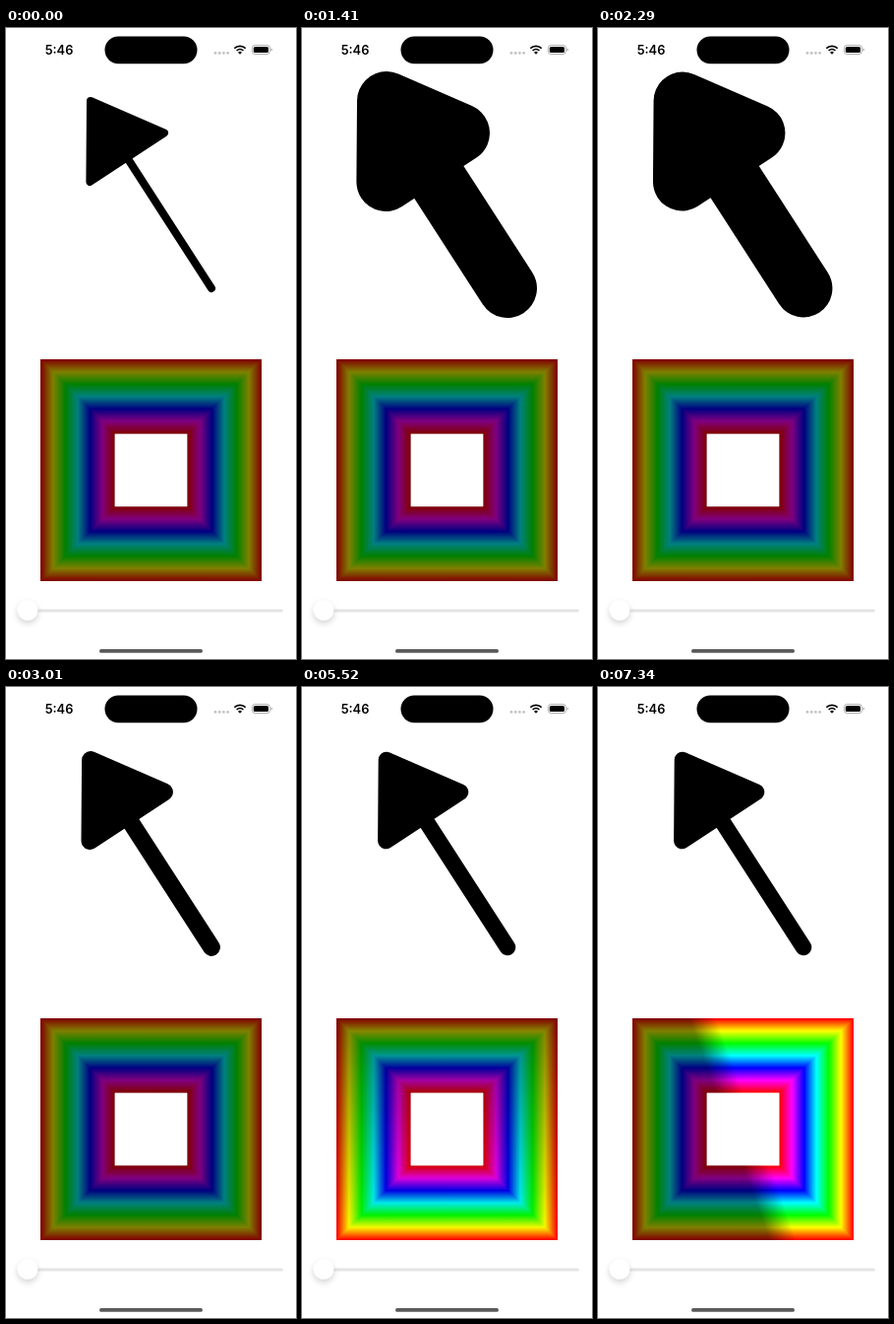
Write an HTML page that moves like this. It is 295 px wide and 640 px high and loops after 8000 ms.

```html
<!DOCTYPE html>
<html lang="en">
<head>
<meta charset="utf-8">
<title>Arrow and colour rectangle</title>
<style>
  html, body { margin: 0; width: 100%; height: 100%; overflow: hidden; background: #fff; }
  svg { display: block; width: 100vw; height: 100vh; }
  .time { font: 600 12.8px Inter, "Liberation Sans", sans-serif; text-anchor: middle; }
</style>
</head>
<body>
<svg viewBox="0 0 295 640">
  <defs>
    <linearGradient id="shade">
      <stop offset="0" stop-color="#000" stop-opacity="0"/>
      <stop offset="1" stop-color="#000" stop-opacity="0.5"/>
    </linearGradient>
    <filter id="soft" x="-60%" y="-60%" width="220%" height="240%">
      <feDropShadow dx="0" dy="3" stdDeviation="3" flood-color="#000" flood-opacity="0.18"/>
    </filter>
  </defs>

  <path id="arrow" d="M86 74L161 106.5L85.4 156ZM123.2 131.5L209 264"
        stroke="#000" stroke-linecap="round" stroke-linejoin="round"/>

  <!-- status bar -->
  <text class="time" x="54" y="26.7">5:46</text>
  <rect x="100.5" y="8.5" width="94" height="27.7" rx="13.85"/>
  <g fill="#c2c2c4">
    <circle cx="213" cy="25.4" r="1.4"/>
    <circle cx="217.2" cy="25.4" r="1.4"/>
    <circle cx="221.4" cy="25.4" r="1.4"/>
    <circle cx="225.6" cy="25.4" r="1.4"/>
  </g>
  <g fill="none" stroke="#000" stroke-width="1.7">
    <path d="M232.3 20.6A8.2 8.2 0 0 1 243.7 20.6"/>
    <path d="M234.6 23A5 5 0 0 1 241.4 23"/>
  </g>
  <path d="M238 26.7L236 24.7A2.9 2.9 0 0 1 240 24.7Z"/>
  <rect x="250.4" y="17.5" width="18" height="9" rx="2.9" fill="none" stroke="#000" stroke-opacity="0.4" stroke-width="0.8"/>
  <rect x="251.8" y="18.9" width="15.2" height="6.2" rx="1.7"/>
  <path d="M269.6 20.4A1.7 1.7 0 0 1 269.6 23.6Z" fill-opacity="0.45"/>

  <g id="rings" fill="none" stroke-width="1.5"></g>
  <rect x="35" y="336" width="225" height="225" fill="url(#shade)"/>
  <rect x="110.7" y="411.7" width="73.6" height="73.6" fill="#fff"/>

  <!-- slider and home bar -->
  <rect x="12" y="589.5" width="270" height="3" rx="1.5" fill="#e5e5e6"/>
  <circle cx="22" cy="590.5" r="10.3" fill="#fff" filter="url(#soft)"/>
  <rect x="95" y="630" width="105" height="3.8" rx="1.9" fill="#5a5a5a"/>
</svg>
<script>
const LOOP = 8000;
const STEPS = 5;
const arrow = document.getElementById("arrow");
const shade = document.getElementById("shade");
const stops = shade.querySelectorAll("stop");

const START_WIDTH = 8;
const taps = [
  { from: 500, to: 790, width: 100 },
  { from: 1260, to: 1550, width: 20 },
  { from: 1990, to: 2290, width: 60 },
  { from: 2710, to: 3010, width: 16.6 }
];
const SETTLED = 4530;

// Unit points run from full brightness to half brightness.
const shades = [
  { at: 4530, line: [0.96, 0.96, 0.06, 0.06] },
  { at: 5520, line: [0.5, 1, 0.5, 0] },
  { at: 6400, line: [0.05, 0.08, 0.95, 0.82] },
  { at: 7340, line: [0.555, 0.48, 0.445, 0.52] }
];

function buildRings() {
  const group = document.getElementById("rings");
  for (let i = 0; i < 100; i++) {
    const inset = i * 0.75 + 0.75;
    const ring = document.createElementNS("http://www.w3.org/2000/svg", "rect");
    const size = 225 - 2 * inset;
    const attrs = {
      x: 35 + inset, y: 336 + inset, width: size, height: size,
      stroke: `hsl(${i * 3.6}, 100%, 50%)`
    };
    for (const name in attrs) ring.setAttribute(name, attrs[name]);
    group.append(ring);
  }
}

const ease = x => x * x * (3 - 2 * x);

function arrowWidth(t) {
  let width = START_WIDTH;
  for (const tap of taps) {
    if (t < tap.from) return width;
    const part = (t - tap.from) / (tap.to - tap.from);
    const step = Math.min(STEPS - 1, Math.floor(part * (STEPS - 1) + 1e-6));
    const next = width + (tap.width - width) * ease((step + 0.5) / STEPS);
    if (t < tap.to || tap === taps[taps.length - 1]) {
      return t >= SETTLED ? tap.width : next;
    }
    const following = taps[taps.indexOf(tap) + 1];
    if (t < following.from) return next;
    width = tap.width;
  }
  return width;
}

function setShade(t) {
  const current = shades.filter(s => s.at <= t).pop();
  stops[0].setAttribute("stop-opacity", current ? 0 : 0.5);
  const line = current ? current.line : [0, 0, 1, 1];
  ["x1", "y1", "x2", "y2"].forEach((name, i) => shade.setAttribute(name, line[i]));
}

function draw(t) {
  arrow.setAttribute("stroke-width", arrowWidth(t).toFixed(2));
  setShade(t);
}

let start;
function tick(now) {
  start ??= now;
  draw((now - start) % LOOP);
  requestAnimationFrame(tick);
}

buildRings();
draw(0);
requestAnimationFrame(tick);
</script>
</body>
</html>
```
